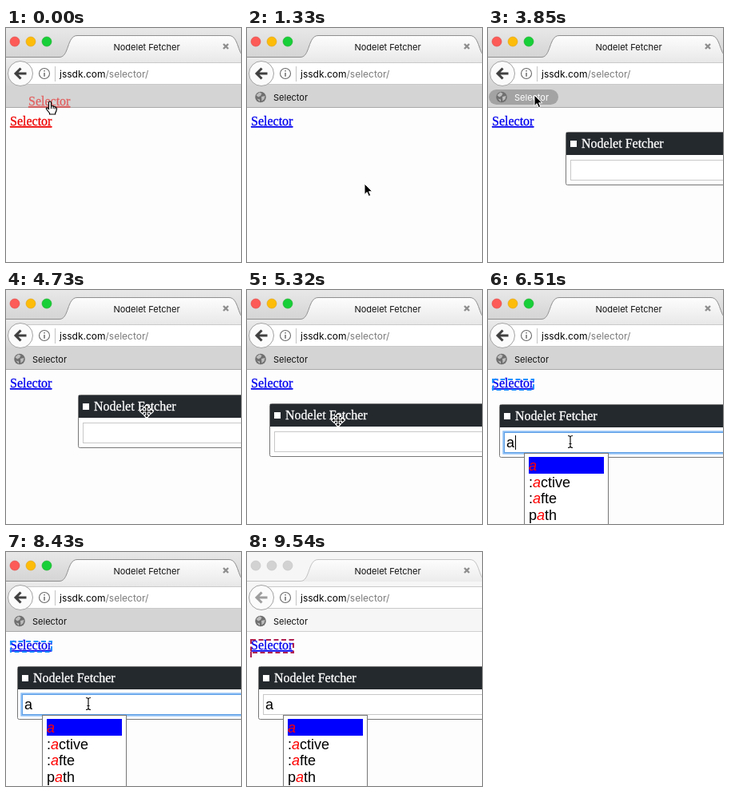
These frames come from a looping animation (294x293 px, 9.64 s). An HTML page:

```html
<!DOCTYPE html>
<html lang="en">
<head>
<meta charset="utf-8">
<title>Nodelet Fetcher</title>
<style>
  html, body { margin: 0; width: 100%; height: 100%; overflow: hidden; background: #fdfdfd; }
  svg { display: block; width: 294px; height: 293px; }
  .ui { font-family: Inter, "Open Sans", sans-serif; font-size: 11px; }
  .url { font-size: 12px; }
  .serif { font: 16px "Liberation Serif", serif; stroke-width: .3; }
  .sans { font: 18px "Liberation Sans", sans-serif; }
  .hit { fill: #f00; font-style: italic; }
  .link { text-decoration: underline; }
  .cursor > * { stroke-linejoin: round; }
  .idle .tint { opacity: .5; }
  .idle .light { fill: #d2d2d2; stroke: #c2c2c2; }
</style>
</head>
<body>
<svg id="stage" viewBox="0 0 294 293">
  <defs>
    <linearGradient id="strip" x2="0" y2="1"><stop stop-color="#e8e8e8"/><stop offset="1" stop-color="#d4d4d4"/></linearGradient>
    <linearGradient id="tab" x2="0" y2="1"><stop stop-color="#fdfdfd"/><stop offset="1" stop-color="#ececec"/></linearGradient>
    <linearGradient id="nav" x2="0" y2="1"><stop stop-color="#ececec"/><stop offset="1" stop-color="#d4d4d4"/></linearGradient>
  </defs>

  <!-- browser window -->
  <rect width="294" height="293" fill="#fdfdfd"/>
  <rect width="294" height="37" fill="url(#strip)"/>
  <rect y="36" width="294" height="38" fill="url(#nav)"/>
  <rect y="73" width="294" height="27" fill="#d4d4d4"/>
  <rect id="pale" width="294" height="100" fill="#f6f6f6"/>
  <path d="M66 37C79 37 76 9.500 89 9.500H279C292 9.500 289 37 302 37Z" fill="url(#tab)"/>
  <path class="tint" d="M0 36.500H67C79 36.500 76 9.500 89 9.500H279C292 9.500 289 36.500 301 36.500" fill="none" stroke="#8f8f8f"/>
  <path class="tint" d="M0 99.500H294" stroke="#a9a9a9"/>
  <g stroke-width=".6">
    <circle class="light" cx="11" cy="17" r="6" fill="#fc5b57" stroke="#df4744"/>
    <circle class="light" cx="31" cy="17" r="6" fill="#fdbc09" stroke="#de9f1c"/>
    <circle class="light" cx="51" cy="17" r="6" fill="#17cf38" stroke="#1eac2c"/>
  </g>
  <text class="ui" x="176" y="27.500" text-anchor="middle" fill="#111">Nodelet Fetcher</text>
  <path d="M272 20l6 6M278 20l-6 6" stroke="#8d8d8d" stroke-width="2.400"/>
  <path d="M24 43.500H300V70.500H24Z" fill="#fff" stroke="#c9c9c9"/>
  <circle cx="18" cy="57" r="15.500" fill="#fbfbfb" stroke="#a3a3a3"/>
  <path class="tint" d="M25.500 57H13M18.500 50.500L12 57l6.500 6.500" fill="none" stroke="#404040" stroke-width="3"/>
  <circle cx="48" cy="57" r="6.500" fill="none" stroke="#6b6b6b" stroke-width="1.100"/>
  <path d="M48 53v1.600M48 56v4.800" stroke="#6b6b6b" stroke-width="1.500"/>
  <path d="M61.500 48V67" stroke="#c4c4c4"/>
  <text class="ui url" x="67" y="62">jssdk.com<tspan fill="#7b7b7b">/selector/</tspan></text>

  <!-- bookmark -->
  <g id="mark">
    <rect id="pill" x="1" y="77" width="87" height="19" rx="9.500" fill="#a3a3a3"/>
    <circle cx="17" cy="86.500" r="6.800" fill="#6f6f6f"/>
    <path d="M11.500 84l4-3.500 3 1.500-1.500 3-3 1.500zM18 86l4.500-1-1 4-3 2.500zM12.500 88.500l3.500 1v3z" fill="#bdbdbd"/>
    <text id="label" class="ui" x="33" y="90.500">Selector</text>
  </g>

  <!-- page -->
  <text id="link" class="serif link" x="5" y="122">Selector</text>
  <g id="glow" fill="none" stroke-width="2">
    <rect id="outline" stroke-dasharray="6 3.500"/>
    <path id="tail" d="M5 125V132"/>
  </g>
  <text id="ghost" class="serif link" x="28" y="97" fill="#ee0000" stroke="#ee0000" opacity=".55">Selector</text>

  <g id="dialog">
    <rect x=".5" y=".5" width="320" height="66" rx="2" fill="#fff" stroke="#777"/>
    <rect x="1" y="1" width="319" height="28" fill="#24292e"/>
    <rect x="6" y="11" width="8" height="8" fill="#fff"/>
    <text class="serif" x="20" y="20" fill="#fff" stroke="#fff">Nodelet Fetcher</text>
    <rect id="ring" x="5.500" y="34.500" width="300" height="27" fill="none" stroke="#8ec0f5" stroke-width="2.500"/>
    <rect id="field" x="6.500" y="35.500" width="298" height="25" fill="#fff"/>
    <text id="typed" class="sans" x="9" y="54">a</text>
    <path id="caret" d="M20.500 39V57" stroke="#000"/>
  </g>

  <g id="list" class="sans">
    <rect x="45.500" y="204.500" width="105" height="100" fill="#fff" stroke="#777"/>
    <rect x="51" y="209" width="94" height="21" fill="#00f"/>
    <text x="51" y="226" class="hit">a</text>
    <text x="51" y="247">:<tspan class="hit">a</tspan>ctive</text>
    <text x="51" y="267">:<tspan class="hit">a</tspan>fte</text>
    <text x="51" y="287.500">p<tspan class="hit">a</tspan>th</text>
  </g>

  <g id="pointer" class="cursor">
    <g id="hand">
      <path d="M-1.500 1.500a1.500 1.500 0 0 1 3 0V6l1-.5 1.800.4.500.6 1.800.2.600.7 1 .6.300 1.200-.8 3.500-1 1.500V16H-.5V14.500L-4.500 9.500c-.6-1.400.8-2.200 1.800-1.200L-1.500 9.500Z" fill="#fff" stroke="#000" stroke-width="1.200"/>
      <path d="M1.500 6V9M4 6.500V9M6.200 7.500V9.500" stroke="#000"/>
    </g>
    <path id="arrow" d="M0 0V13.500L3.200 10.600 5.300 15.600 7.700 14.600 5.600 9.800H9.800Z" fill="#000" stroke="#fff"/>
    <path id="move" d="M0-8.500l3.500 4H1.200v3.300h3.300v-2.300l4 3.500-4 3.500V1.200H1.200v3.300h2.300l-3.500 4-3.500-4h2.300V1.200h-3.300v2.300l-4-3.500 4-3.500v2.300h3.300v-3.300h-2.300Z" fill="#000" stroke="#fff" stroke-width="1.200"/>
    <path id="beam" d="M-3-7.500Q0-7.500 0-5.500Q0-7.500 3-7.500M0-5.500V5.500M-3 7.500Q0 7.500 0 5.500Q0 7.500 3 7.500M-1.500 2.500h3" fill="none" stroke="#111" stroke-width="1.200"/>
  </g>
</svg>
<script>
const LOOP = 9640, TICK = 147.7, STEP = 148;
const $ = id => document.getElementById(id);
const show = (id, on) => { $(id).style.display = on ? '' : 'none'; };
const place = (id, [x, y]) => $(id).setAttribute('transform', `translate(${x} ${y})`);
const set = (id, attrs) => { for (const k in attrs) $(id).setAttribute(k, attrs[k]); };
const mix = (a, b, p) => a + (b - a) * p;

// Rows of time, x, y
const pointerPath = [
  [0, 55, 92], [148, 54, 84], [740, 57, 88], [1184, 76, 142], [1332, 147, 195],
  [1628, 147, 195], [2072, 286, 268], [2664, 60, 94], [2812, 58, 84], [2960, 57, 80],
  [3848, 58, 84], [4440, 182, 150], [4736, 176, 152], [4884, 156, 160],
  [5476, 100, 164], [5772, 100, 164], [6068, 103, 190], [8436, 103, 190], [9028, 286, 296]
];
const dialogPath = [[3256, 97, 130], [4440, 97, 130], [4736, 90, 131], [4884, 70, 139], [5476, 14, 143]];
const cursors = [['hand', 0], ['arrow', 148], ['move', 4440], ['beam', 5920], ['arrow', 8584]];

function along(path, t) {
  const i = path.findIndex(p => p[0] > t);
  if (i < 0) return path.at(-1).slice(1);
  if (i === 0) return path[0].slice(1);
  const a = path[i - 1], b = path[i], p = (t - a[0]) / (b[0] - a[0]);
  return [mix(a[1], b[1], p), mix(a[2], b[2], p)].map(Math.round);
}

function render(time) {
  const t = Math.floor(time / TICK) * STEP;
  const dropped = t >= 148, typed = t >= 6512, idle = t >= 9310;
  const focus = t >= 6216 && !idle;
  const pos = along(pointerPath, t);
  const kind = cursors.findLast(c => c[1] <= t)[0];
  const hover = kind === 'arrow' && pos[1] < 94;
  const linkColor = dropped ? '#0000ee' : '#ee0000';

  show('mark', dropped);
  show('ghost', !dropped);
  show('pill', hover);
  set('label', { fill: hover ? '#fff' : '#111' });
  set('link', { fill: linkColor, stroke: linkColor });

  show('dialog', t >= 3256);
  place('dialog', along(dialogPath, t));
  show('ring', focus);
  set('field', { stroke: focus ? '#5c9ee6' : '#c8c8c8' });
  for (const id of ['typed', 'list', 'glow']) show(id, typed);
  show('caret', focus && (!typed || Math.floor((t - 6512) / 530) % 2 === 0));

  const p = (1 - Math.cos((t - 6512) / 1000 * Math.PI)) / 2;
  const rgb = [[30, 176], [144, 32], [255, 80]].map(c => Math.round(mix(...c, p)));
  set('glow', { stroke: `rgb(${rgb})` });
  set('outline', { x: mix(6, 5, p), y: mix(112, 110, p), width: mix(51, 53, p), height: mix(13, 16, p) });
  set('tail', { opacity: p });

  for (const [id] of cursors) show(id, id === kind);
  place('pointer', pos);
  show('pointer', !idle);
  show('pale', idle);
  $('stage').classList.toggle('idle', idle);
}

const start = performance.now();
function tick() {
  render((performance.now() - start) % LOOP);
  requestAnimationFrame(tick);
}
tick();
</script>
</body>
</html>
```
